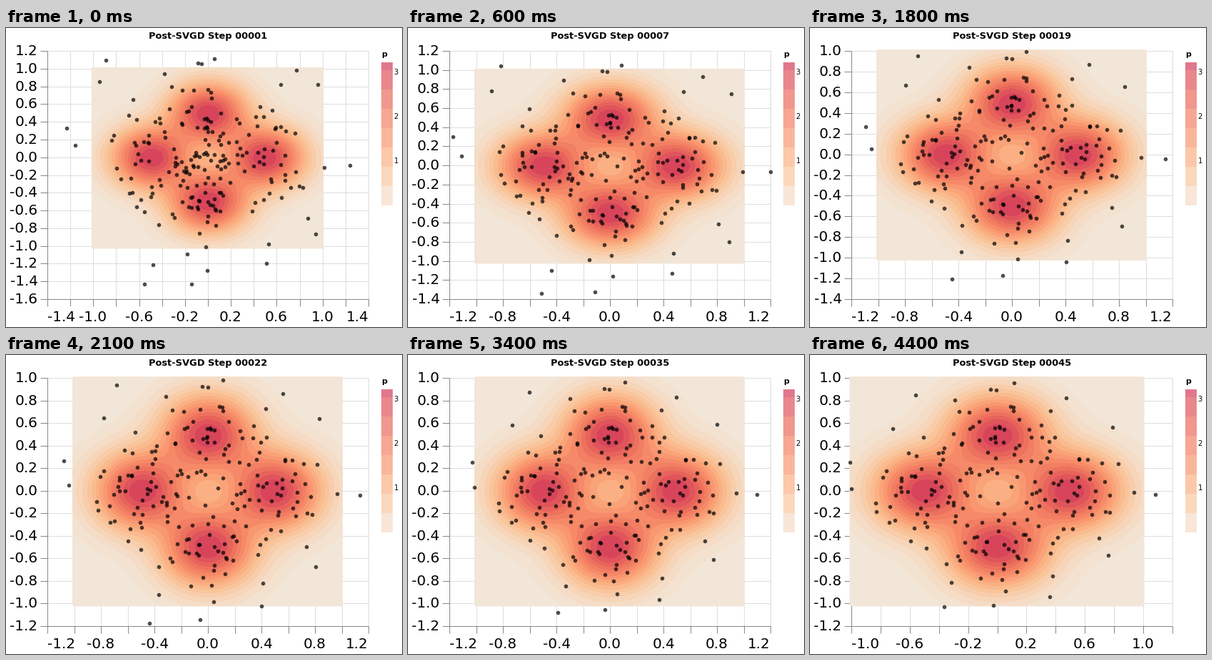
A matplotlib script for the animation above (4.58 s loop, 555x418 px).

```python
import numpy as np
import matplotlib.pyplot as plt
from matplotlib.animation import FuncAnimation
from matplotlib.collections import LineCollection
from matplotlib.colors import LinearSegmentedColormap

W, H, DPI = 555, 418, 80
LEFT, RIGHT, TOP, BOTTOM = 58.5, 508.5, 32.5, 379.5
STEPS, PEAK = 45, 3.22
PX = 72 / DPI  # points per pixel

CMAP = LinearSegmentedColormap.from_list("warm", [
    "#f2e7da", "#f7d5ba", "#f9c499", "#fab184", "#fa9c73",
    "#f68967", "#ef7860", "#e8645b", "#de515b", "#d43d5b"], 512)

# first step, x range, y range
VIEWS = [(1, -1.4, 1.4, -1.6, 1.2),
         (3, -1.4, 1.4, -1.4, 1.2),
         (4, -1.2, 1.4, -1.4, 1.2),
         (7, -1.2, 1.2, -1.4, 1.2),
         (13, -1.2, 1.2, -1.4, 1.0),
         (20, -1.2, 1.2, -1.2, 1.0),
         (40, -1.0, 1.2, -1.2, 1.0)]


def to_stage(x, y, view):
    _, x0, x1, y0, y1 = view
    return (LEFT + (x - x0) / (x1 - x0) * (RIGHT - LEFT),
            TOP + (y1 - y) / (y1 - y0) * (BOTTOM - TOP))


def to_data(px, py, view):
    _, x0, x1, y0, y1 = view
    return (x0 + (px - LEFT) / (RIGHT - LEFT) * (x1 - x0),
            y1 - (py - TOP) / (BOTTOM - TOP) * (y1 - y0))


# ---- density: four equal Gaussians -----------------------------------------
CENTRES = np.array([(0.5, 0), (-0.5, 0), (0, 0.5), (0, -0.5)])
VAR = 0.05


def density(x, y):
    total = sum(np.exp(-((x - cx) ** 2 + (y - cy) ** 2) / (2 * VAR))
                for cx, cy in CENTRES)
    return total / (2 * np.pi * VAR)


def score(pts):
    """Gradient of the log density."""
    gap = CENTRES - pts[:, None]
    w = np.exp(-(gap ** 2).sum(2) / (2 * VAR))
    w /= w.sum(1, keepdims=True)
    return (w[..., None] * gap).sum(1) / VAR


# ---- particles: Stein variational gradient descent -------------------------
COUNT, RATE, BANDWIDTH = 200, 0.1, 0.13
OUTLIERS = np.array([
    (-1.233, 0.33), (-1.16, 0.135), (-0.89, 1.1), (-0.95, 0.855),
    (0.05, 1.115), (0.77, 0.99), (0.957, 0.823), (1.237, -0.083),
    (0.938, -0.865), (0.867, -0.687), (-0.558, -1.43), (-0.144, -1.43),
    (-0.48, -1.21), (-0.01, -1.27), (0.506, -1.19), (0.525, -0.978),
    (-0.185, -1.084), (-0.02, -1.01), (-0.09, 1.067), (-0.06, 1.06),
    (-0.38, 0.946), (1.013, -0.113), (0.633, 0.823), (-0.655, 0.657)])


def svgd_step(pts):
    gap = pts[:, None] - pts[None]
    k = np.exp(-(gap ** 2).sum(2) / BANDWIDTH)
    pull = k @ score(pts)
    push = (k[..., None] * gap).sum(1) * 2 / BANDWIDTH
    return pts + RATE * (pull + push) / COUNT


def simulate():
    cloud = np.random.default_rng(7).normal(0, 0.5, (600, 2))
    cloud = cloud[np.hypot(*cloud.T) < 0.92][:COUNT - len(OUTLIERS)]
    path = [np.vstack([OUTLIERS, cloud])]
    while len(path) < STEPS:
        path.append(svgd_step(path[-1]))
    return path


PATH = simulate()


# ---- coloured field --------------------------------------------------------
def banded(t, bands, gamma=1.0):
    """Colours in flat bands; gamma below 1 makes the low ones finer."""
    band = np.floor(np.clip(t, 0, 0.999) ** gamma * bands)
    return CMAP(((band + 0.5) / bands) ** (1 / gamma))


def render(view):
    """Density patch and colour bar on a transparent stage."""
    px, py = np.meshgrid(np.arange(W) + 0.5, np.arange(H) + 0.5)
    img = banded(density(*to_data(px, py, view)) / PEAK, 16, 0.7)
    l, t = to_stage(-1, 1, view)
    r, b = to_stage(1, -1, view)
    l, t, r, b = l - 3, t - 2.4, r + 1, b + 3.4
    corner = 2.5
    dx = np.maximum(np.maximum(l + corner - px, px - r + corner), 0)
    dy = np.maximum(np.maximum(t + corner - py, py - b + corner), 0)
    img[..., 3] = np.clip(corner + 0.5 - np.hypot(dx, dy), 0, 1)
    bar = banded((248 - py[48:248, 526:542]) / 200, 7.4)
    bar[..., 3] = 0.7
    img[48:248, 526:542] = bar
    return (img * 255).round().astype(np.uint8)


# ---- axes ------------------------------------------------------------------
def ticks(lo, hi):
    return np.arange(round(lo * 5), round(hi * 5) + 1) / 5


def layout(view):
    """Grid lines, axis lines and labels (x, y, text, alignment)."""
    _, x0, x1, y0, y1 = view
    grid, axis, labels = [], [], []
    xs, ys = ticks(x0, x1), ticks(y0, y1)
    for i, v in enumerate(xs):
        x = np.floor(to_stage(v, 0, view)[0] + 1e-6) + 0.5
        grid.append([(x, TOP), (x, BOTTOM)])
        axis.append([(x, BOTTOM), (x, BOTTOM + 10)])
        if i % 2 == 0:
            side = "left" if i == 0 else "right" if i == len(xs) - 1 else "center"
            labels.append((x - 0.5, 409.5, f"{v:.1f}", side))
    for v in ys:
        y = np.floor(to_stage(0, v, view)[1] + 1e-6) + 0.5
        grid.append([(LEFT, y), (RIGHT, y)])
        axis.append([(LEFT - 10, y), (LEFT, y)])
        labels.append((44.5, y + 5.5, f"{v:.1f}", "right"))
    axis += [[(LEFT, TOP), (LEFT, BOTTOM)], [(LEFT, BOTTOM), (RIGHT, BOTTOM)]]
    return grid, axis, labels


SCENES = [(v, render(v), *layout(v)) for v in VIEWS]

plt.rcParams["font.family"] = "DejaVu Sans"
fig = plt.figure(figsize=(W / DPI, H / DPI), dpi=DPI, facecolor="white")
ax = fig.add_axes([0, 0, 1, 1])
ax.axis("off")


def text(x, y, s, size, **kw):
    return ax.text(x, y, s, fontsize=size * PX, va="baseline", color="black", **kw)


def lines(color, zorder):
    made = LineCollection([], colors=color, linewidths=PX, zorder=zorder)
    made.set_snap(False)
    return ax.add_collection(made, autolim=False)


grid_lines = lines("#dddddd", 1)
axis_lines = lines("#888888", 1.5)
field = ax.imshow(SCENES[0][1], extent=(0, W, H, 0), interpolation="nearest",
                  aspect="auto", zorder=2)
dots = ax.scatter(*PATH[0].T, s=(5.6 * PX) ** 2, c="black", alpha=0.7,
                  linewidths=0, zorder=3)
ax.set(xlim=(0, W), ylim=(H, 0))

title = text(283.5, 15.5, "", 13, weight="bold", ha="center")
text(526, 40, "p", 11, weight="bold")
for n in (1, 2, 3):
    text(543.5, 248 - n / PEAK * 200 + 3, str(n), 10)
labels = [text(0, 0, "", 20) for _ in range(max(len(s[4]) for s in SCENES))]


def draw(frame):
    step = min(frame // 5 + 1, STEPS)
    view, img, grid, axis, names = [s for s in SCENES if s[0][0] <= step][-1]
    grid_lines.set_segments(grid)
    axis_lines.set_segments(axis)
    field.set_data(img)
    for label in labels:
        label.set_text("")
    for label, (x, y, s, side) in zip(labels, names):
        label.set(x=x, y=y, text=s, ha=side)
    title.set_text(f"Post-SVGD Step {step:05d}")
    dots.set_offsets(np.stack(to_stage(*PATH[step - 1].T, view), axis=1))
    return []


anim = FuncAnimation(fig, draw, frames=229, interval=20, repeat=True,
                     repeat_delay=0, init_func=lambda: draw(0))
plt.show()
```
